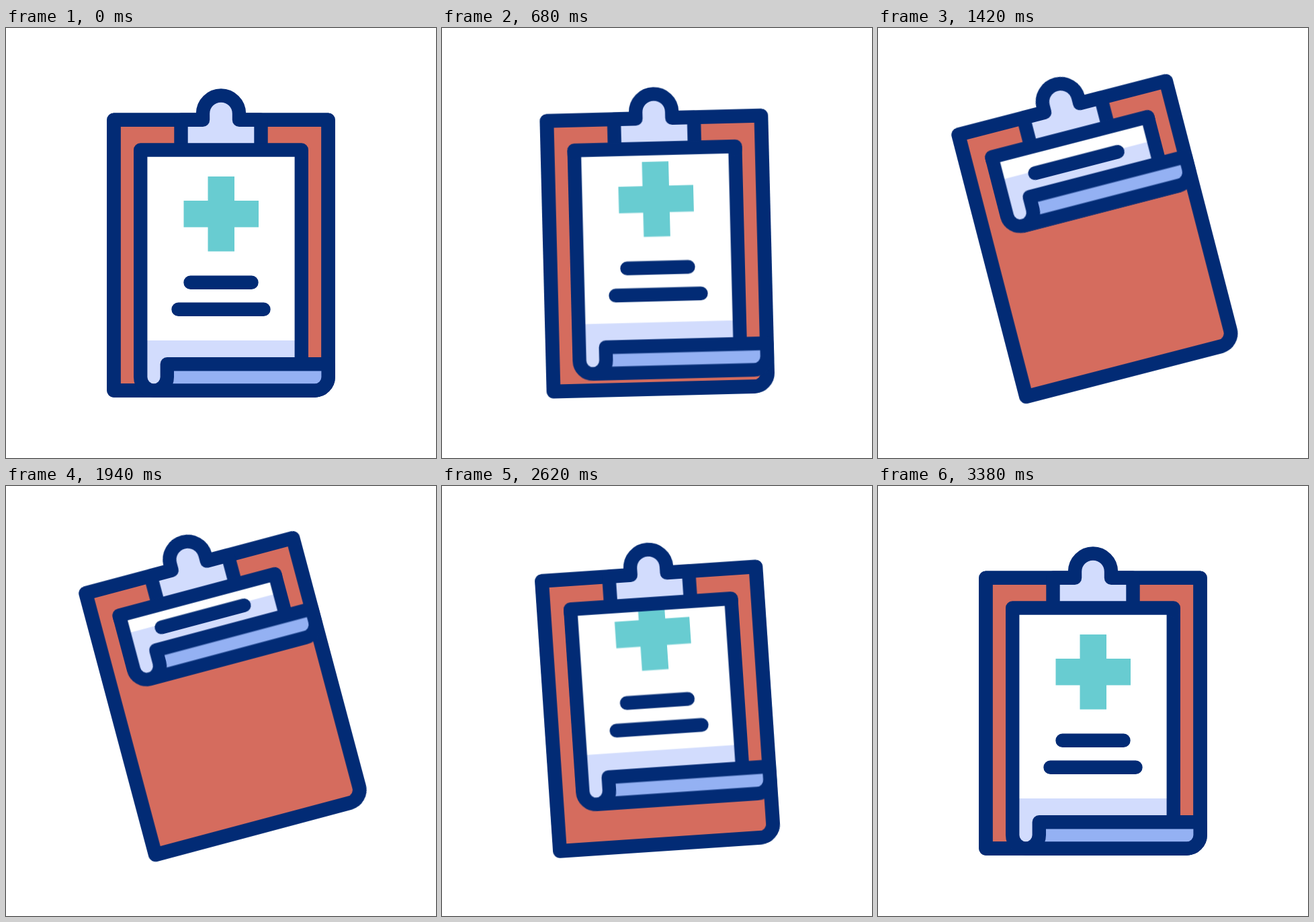
These frames come from a looping animation (640x640 px, 3.6 s). An HTML page:

```html
<!DOCTYPE html>
<html lang="en">
<head>
<meta charset="utf-8">
<title>Medical clipboard</title>
<style>
  html, body { margin: 0; width: 100%; height: 100%; overflow: hidden; background: #fff; }
  svg { display: block; width: 100vw; height: 100vh; }

  .line { fill: none; stroke: #022b75; stroke-width: 20.4; stroke-linecap: round; stroke-linejoin: round; }
  .red { fill: #d56c5e; }
  .pale { fill: #d2dcfd; }
  .blue { fill: #94b1f3; }
  .teal { fill: #68ccd1; }
  .white { fill: #fff; }

  .board, .sheet, .print { animation: 3600ms infinite; }
  .board { animation-name: tilt; transform-origin: 320px 320px; }
  .sheet { animation-name: roll; }
  .print { animation-name: lift; }

  /* hold 200 ms, move 1600 ms, return 1600 ms, hold 200 ms */
  @keyframes tilt {
    0%, 94.4444%, 100% { transform: translateY(0) rotate(0deg); }
    5.5556% { transform: translateY(0) rotate(0deg); animation-timing-function: cubic-bezier(.75, 0, .13, 1); }
    50% { transform: translateY(-24.5px) rotate(-15deg); animation-timing-function: cubic-bezier(.75, 0, .11, 1); }
  }
  @keyframes roll {
    0%, 94.4444%, 100% { transform: translateY(0); }
    5.5556% { transform: translateY(0); animation-timing-function: cubic-bezier(.75, 0, .13, 1); }
    50% { transform: translateY(-256px); animation-timing-function: cubic-bezier(.75, 0, .11, 1); }
  }
  @keyframes lift {
    0%, 94.4444%, 100% { transform: translateY(0); }
    5.5556% { transform: translateY(0); animation-timing-function: cubic-bezier(.75, 0, .13, 1); }
    50% { transform: translateY(-205px); animation-timing-function: cubic-bezier(.75, 0, .11, 1); }
  }
</style>
</head>
<body>
<svg viewBox="0 0 640 640">
  <clipPath id="below"><rect x="0" y="181.5" width="640" height="460"/></clipPath>

  <g class="board">
    <path id="back" class="red" d="M160.4 136.8H479.6V519.5a20 20 0 0 1-20 20H160.4Z"/>
    <use href="#back" class="line"/>
    <path class="line" d="M160.4 136.8H479.6V519.5a20 20 0 0 1-20 20H160.4Z"/>

    <!-- clip -->
    <path class="pale" d="M260.5 181.5V136.8H293V127.5a27 27 0 0 1 54 0V136.8H379.5V181.5Z"/>
    <path class="line" d="M260.5 181.5V136.8H293V127.5a27 27 0 0 1 54 0V136.8H379.5V181.5"/>

    <!-- page with rolled lower edge -->
    <g clip-path="url(#below)">
      <g class="sheet">
        <path class="white" d="M200.2 181.5H439.8V466H200.2Z"/>
        <path class="pale" d="M200.2 465H439.8V500.3H239.8V519.5a19.8 20 0 0 1-39.6 0Z"/>
      </g>
      <g class="print">
        <path class="teal" d="M300.5 221H340V257H376V296.5H340V332.5H300.5V296.5H264.5V257H300.5Z"/>
        <path class="line" d="M274.5 378.7H365.5M256.5 418.8H383.5"/>
      </g>
      <g class="sheet">
        <path class="blue" d="M239.8 500.3H479.6V519.5a20 20 0 0 1-20 20H220a19.8 20 0 0 0 19.8-20Z"/>
        <path class="line" d="M439.8 181.5V500.3M200.2 181.5V519.5a19.8 20 0 0 0 39.6 0V500.3H479.6V519.5a20 20 0 0 1-20 20H220"/>
      </g>
    </g>
    <path class="line" d="M200.2 186V181.5H439.8V186"/>
  </g>
</svg>
</body>
</html>
```
